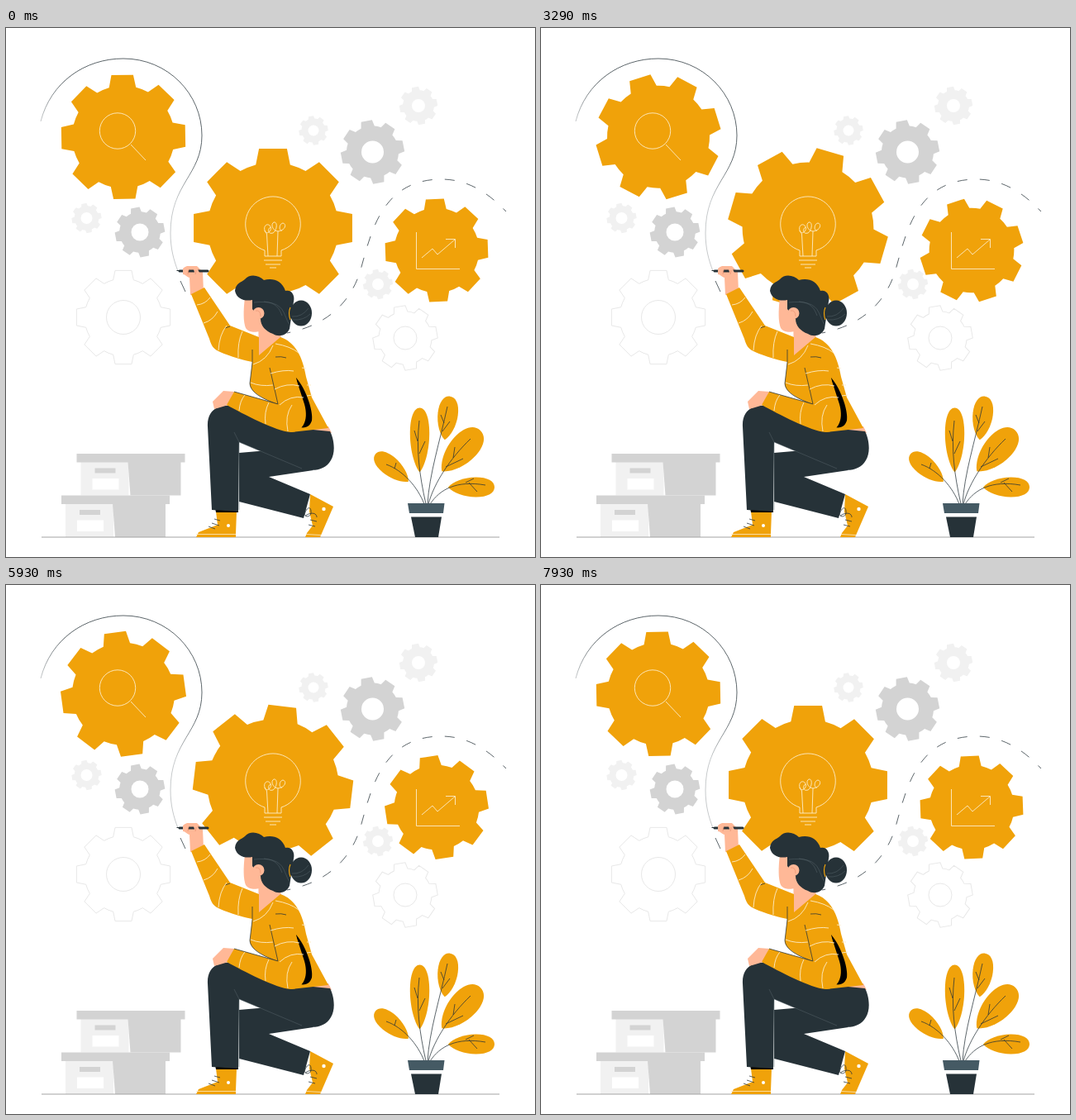
An HTML page for the animation above (8000 ms loop, 640 by 640 pixels).

```html
<!DOCTYPE html>
<html lang="en">
<head>
<meta charset="utf-8">
<title>Turning gears</title>
<style>
html, body { margin: 0; width: 100%; height: 100%; overflow: hidden; background: #fff; }
svg { display: block; width: 100vw; height: 100vh; }
.o { fill: #f0a20a; }
.d { fill: #263238; }
.s { fill: #ffb897; }
.g { fill: #d3d3d3; }
.l { fill: #f1f1f1; }
.w { fill: #fff; }
.ink { fill: none; stroke: #263238; stroke-width: .75; }
.cream { fill: none; stroke: #fdecc8; stroke-width: .9; }
.soft { fill: none; stroke: #56646b; stroke-width: .5; }
.outline { fill: #fff; stroke: #e8e8e8; stroke-width: 1; }
</style>
</head>
<body>
<svg viewBox="0 0 640 640">
  <defs>
    <path id="leaf" d="M-1 0C-.8 -.55 -.3 -1 .2 -1S1 -.6 1 0S.7 1 .2 1S-.8 .55 -1 0Z"/>
    <linearGradient id="fade" gradientUnits="userSpaceOnUse" x1="42" y1="113" x2="70" y2="65">
      <stop stop-color="#263238" stop-opacity=".35"/>
      <stop offset="1" stop-color="#263238"/>
    </linearGradient>
  </defs>

  <g id="gears"></g>

  <!-- pen trail -->
  <g class="ink">
    <path d="M42 113C54 66 95 37 142 37C196 37 237 80 237 130C237 178 199 188 199 248C199 267 203 281 208 294" stroke="url(#fade)"/>
    <path d="M211 306L217 319"/>
    <path d="M605 222C585 201 560 183 527 183C452 183 441 252 428 296C415 335 386 360 340 369" stroke-dasharray="12 15" stroke-dashoffset="7"/>
  </g>

  <!-- icons -->
  <g class="cream">
    <circle cx="135" cy="124.500" r="21.700"/>
    <path d="M151 141L169 160"/>
    <path d="M313 276V269A33.300 33.300 0 1 1 333 269V276Z"/>
    <path d="M312 281H334M314 286H332M319 290H327"/>
    <path d="M317 276L315.500 249C309 242 315 235 319 239C324 244 315 252 313 245M328 276L329 246C322 245 320 237 324 235C329 234 328 245 323 248C317 250 316 243 320 241M329 246C338 245 340 237 335 236C330 237 330 246 334 245"/>
    <path d="M496.500 247V291.500H549M503 278L516 267L522 274L543 256M532 255.500H543.500V266"/>
  </g>

  <!-- boxes -->
  <g id="boxes"></g>
  <path d="M43 616H597" stroke="#a3a3a3" stroke-width="1"/>

  <!-- plant -->
  <g class="o">
    <use href="#leaf" transform="translate(467 532) rotate(220) scale(26 11.500)"/>
    <use href="#leaf" transform="translate(500.500 498.500) rotate(-90) scale(39 11.700)"/>
    <use href="#leaf" transform="translate(534 472) rotate(-83) scale(26.500 12.200)"/>
    <use href="#leaf" transform="translate(550.500 511.500) rotate(-47) scale(34 17)"/>
    <use href="#leaf" transform="translate(563 555.500) scale(28 12)"/>
  </g>
  <g class="ink">
    <path d="M506 576C498 555 480 535 460 528M508 576C500 540 496 510 500 475M498 500L494 487M500 515L507 500"/>
    <path d="M510 576C512 540 525 500 534 458M530 478L526 468M528 488L537 476M511 576C518 550 538 520 562 497M541 520L543 507M532 531L553 521"/>
    <path d="M513 576C525 558 545 547 580 553M556 550L566 545M560 550L570 561M470 533L472 526"/>
  </g>
  <path d="M486 575H530.500L529 587H488Z" fill="#455a64"/>
  <path class="d" d="M490 591.500H527L523 616H495Z"/>

  <!-- legs and shoes -->
  <path class="o" d="M368 564L396 579L380 616H362L364 611L371 602L367 585Z"/>
  <path class="o" d="M254 585H279L278 612V616H230L233 610L256 601Z"/>
  <path d="M230 612.500H278M363 612.500L381 613.500" stroke="#fdecc8" stroke-width=".8"/>
  <circle class="w" cx="269" cy="602" r="2"/>
  <circle class="w" cx="384.500" cy="582" r="2.200"/>
  <path class="ink" d="M252 594L259 596M249 599L258 602M245 603L253 606M361 590C362 582 368 577 369 584S364 592 362 590C370 585 376 587 376 592M368 595L376 597M366 601L374 603"/>
  <path class="d" d="M282 514L340 509L372 535L318 543L368 564L360 593L282 573Z"/>
  <path d="M253 581H281V586H254Z"/>
  <path class="s" d="M368 480L390 482L394 490L368 488Z"/>
  <path class="d" d="M244 482C243 463 256 455 272 457L330 482L392 488C397 497 399 514 393 523C386 535 372 537 358 533L282 501L281 585L249 583Z"/>
  <path class="soft" d="M276 489L282 501V583M282 501L358 533"/>

  <!-- torso and raised arm -->
  <path class="s" d="M305 346L331 352L333 378L306 398Z"/>
  <path class="s" d="M223 323L222 302C218 301 213 296 214 293L219 288L231 288L238 295L239 319Z"/>
  <path class="o" d="M224 322L240 314L271 360L306 374V396L332 374C350 380 359 398 363 422L370 447L390 484L345 489L327 455C312 449 294 440 295 430L298 404C282 401 265 395 255 390C249 386 248 382 246 376Z"/>
  <path class="ink" d="M271 361L265 363M298 389L298 405L295 430C296 442 312 449 328 455M326 398Q333 397 339 399"/>
  <path class="cream" d="M231 335Q241 334 247 326M239 357Q250 354 256 343M257 390Q258 371 267 360M281 399Q280 380 286 367M299 407Q316 402 323 384M326 382Q344 385 354 393M296 429Q308 434 323 432M358 411L363 412M364 432L369 432M364 445L371 444"/>
  <path d="M351 423C364 438 372 465 370 475C367 484 360 484 356 483C363 470 355 452 351 423Z"/>

  <!-- resting arm -->
  <path class="s" d="M276 440L263 439L250 452L252 461L269 456Z"/>
  <path class="o" d="M276 440L329 455L317 410C326 399 343 402 349 418L361 455C367 476 358 489 344 489C327 488 287 467 267 456Z"/>
  <path class="ink" d="M276 440L329 455L319 411"/>
  <path class="cream" d="M320 418Q336 413 348 415M325 437Q340 429 355 433M331 456Q344 444 360 447M282 463Q283 451 289 444M314 479Q312 465 318 453M341 488Q337 469 346 456"/>

  <!-- head -->
  <path class="s" d="M289 326C287 342 287 356 290 363C294 369 302 368 307 367L317 345L302 325Z"/>
  <path class="d" d="M298 329C289 331 279 328 277 318C278 308 285 308 289 304C295 297 306 299 312 305C322 302 334 305 338 318C345 316 350 323 348 331L343 364C339 373 329 374 323 370C314 367 308 360 308 352L298 340Z"/>
  <circle class="s" cx="305.500" cy="345" r="7"/>
  <path d="M302 342Q308 341 308 349" fill="none" stroke="#e58f6e" stroke-width=".6"/>
  <ellipse class="d" cx="357" cy="345" rx="13" ry="15.500"/>
  <path d="M344 338Q341 345 344 353" fill="none" stroke="#f0a20a" stroke-width="1.200"/>
  <path class="soft" d="M300 332C318 330 331 333 336 344S341 357 343 358M312 331C327 332 331 340 334 348M346 349Q358 350 366 339M347 353Q360 354 368 346"/>

  <!-- pen -->
  <path d="M210 294H244" stroke="#263238" stroke-width="3" stroke-linecap="round"/>
  <path d="M206.500 293.500H212" stroke="#263238"/>
  <path class="s" d="M214 291Q219 286 222 290L219 299L214 298ZM227 292L231 290L234 296L229 299Z"/>
  <path d="M220 298L221 293M229 298L230 293" stroke="#e58f6e" stroke-width=".7"/>
</svg>

<script>
const RAD = Math.PI / 180;
const gears = document.getElementById('gears');

function add(parent, tag, attrs) {
  const node = document.createElementNS('http://www.w3.org/2000/svg', tag);
  for (const name in attrs) node.setAttribute(name, attrs[name]);
  return parent.appendChild(node);
}

// Eight tapered teeth joined by arcs of the root circle.
function gearPath(radius) {
  const root = radius * 0.815;
  const point = (r, a) => `${(r * Math.sin(a * RAD)).toFixed(2)} ${(-r * Math.cos(a * RAD)).toFixed(2)}`;
  let d = '';
  for (let a = 0; a < 360; a += 45) {
    d += (a ? `A${root} ${root} 0 0 1 ` : 'M') + point(root, a - 15.2);
    d += `L${point(radius, a - 10)}L${point(radius, a + 10)}L${point(root, a + 15.2)}`;
  }
  return d + `A${root} ${root} 0 0 1 ${point(root, -15.2)}Z`;
}

function addGear(x, y, radius, hole, angle, style) {
  const group = add(gears, 'g', { transform: `translate(${x} ${y})` });
  const wheel = add(group, 'path', { d: gearPath(radius), class: style, transform: `rotate(${angle})` });
  if (hole) add(group, 'circle', { r: hole, class: style === 'outline' ? style : 'w' });
  return wheel;
}

addGear(372, 124, 17.8, 6.5, -10, 'l');
addGear(499, 94, 23.2, 8, -10, 'l');
addGear(97.5, 230, 18.2, 7, -10, 'l');
addGear(450, 310, 18.2, 7, -10, 'l');
addGear(443.5, 150, 38.7, 13.5, -11, 'g');
addGear(162, 247, 30.4, 10.5, -11, 'g');
addGear(142, 350, 57.5, 20.5, 0, 'outline');
addGear(483, 375, 39.3, 14, -10, 'outline');

const spinners = [
  { wheel: addGear(142, 131.8, 76.1, 0, 0, 'o'), start: -1, direction: 1 },
  { wheel: addGear(323, 242, 97.4, 0, 0, 'o'), start: 0, direction: -1 },
  { wheel: addGear(521, 269, 63, 0, 0, 'o'), start: -2, direction: 1 }
];

function addBox(x, y) {
  const box = add(document.getElementById('boxes'), 'g', { transform: `translate(${x} ${y})` });
  const shape = (style, d) => add(box, 'path', { class: style, d });
  shape('l', 'M5 10H63V50.500H5Z');
  shape('g', 'M62 10H126V50.500H65Z');
  shape('g', 'M0 0H131V10.500H0Z');
  shape('g', 'M22 17.500H47V23.500H22Z');
  shape('w', 'M19 30H51V43.500H19Z');
}
addBox(85.5, 515);
addBox(67, 565.5);

const LOOP = 8, FPS = 14;

function draw(now) {
  const seconds = now / 1000 % LOOP;
  const t = Math.floor(seconds * FPS + 0.1) / FPS;
  const turn = 3.03 * t * t - 0.1115 * t ** 3; // gradual spin-up, in degrees
  for (const { wheel, start, direction } of spinners) {
    wheel.setAttribute('transform', `rotate(${start + direction * turn})`);
  }
  requestAnimationFrame(draw);
}
draw(0);
</script>
</body>
</html>
```
